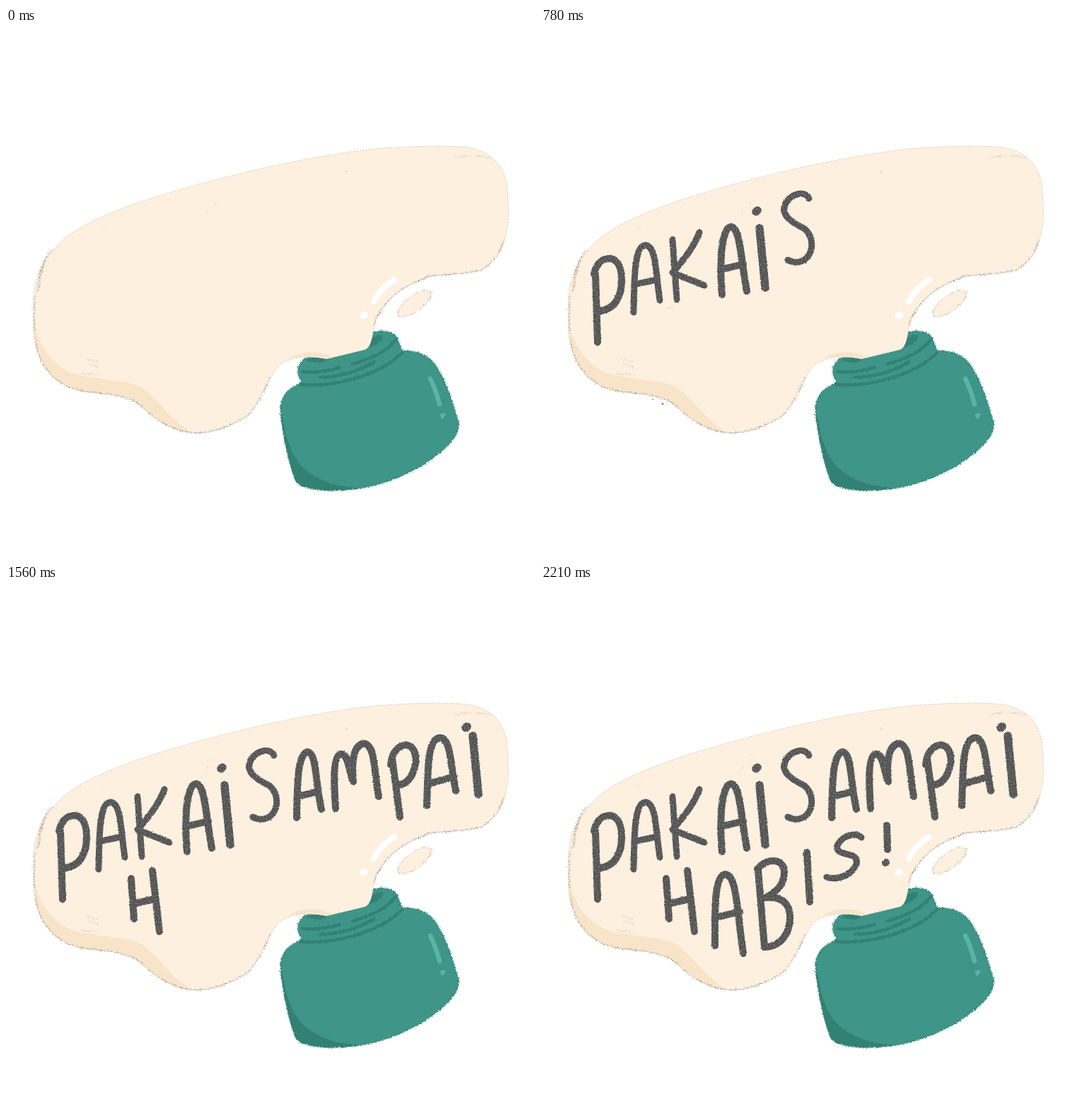
Recreate the animation shown at these times as an HTML page. Size 748 px wide and 748 px high, loop 2.47 s.

```html
<!DOCTYPE html>
<html lang="id">
<head>
<meta charset="utf-8">
<title>Pakai sampai habis!</title>
<style>
  html, body { margin: 0; width: 100%; height: 100%; overflow: hidden; background: #fff; }
  svg { display: block; width: 100vw; height: 100vh; }
  path { stroke-linecap: round; stroke-linejoin: round; }
  .line { fill: none; }
  .dark { stroke: #328174; stroke-width: 4.5; }
  .grit { stroke: #756b60; stroke-width: 1; stroke-dasharray: 1 1.5; stroke-linecap: butt; opacity: .75; }
  .fine { stroke: #9b958c; stroke-width: .8; stroke-dasharray: 1 3; stroke-linecap: butt; opacity: .6; }
  #letters path { fill: none; stroke: #4f5052; stroke-width: 10; }
  #letters .thin { stroke-width: 9; }
  #letters .thick { stroke-width: 11.5; }
</style>
</head>
<body>
<svg viewBox="0 0 748 748" role="img" aria-label="PAKAI SAMPAI HABIS!">
  <defs>
    <!-- The noise is made opaque so that the displacement has no overall drift. -->
    <filter id="rough" filterUnits="userSpaceOnUse" x="0" y="0" width="748" height="748" color-interpolation-filters="sRGB">
      <feTurbulence type="fractalNoise" baseFrequency=".45" numOctaves="2" seed="4"/>
      <feColorMatrix values="1 0 0 0 0  0 1 0 0 0  0 0 1 0 0  0 0 0 0 1" result="noise"/>
      <feDisplacementMap in="SourceGraphic" in2="noise" scale="4" xChannelSelector="R" yChannelSelector="G"/>
    </filter>
    <filter id="spray" filterUnits="userSpaceOnUse" x="0" y="0" width="748" height="748" color-interpolation-filters="sRGB">
      <feTurbulence type="fractalNoise" baseFrequency=".6" numOctaves="2" seed="9"/>
      <feColorMatrix values="1 0 0 0 0  0 1 0 0 0  0 0 1 0 0  0 0 0 0 1" result="noise"/>
      <feDisplacementMap in="SourceGraphic" in2="noise" scale="8" xChannelSelector="R" yChannelSelector="G"/>
    </filter>
    <filter id="chalk" filterUnits="userSpaceOnUse" x="0" y="0" width="748" height="748" color-interpolation-filters="sRGB">
      <feTurbulence type="fractalNoise" baseFrequency=".5" numOctaves="2" seed="2" result="grain"/>
      <feColorMatrix values="1 0 0 0 0  0 1 0 0 0  0 0 1 0 0  0 0 0 0 1" result="noise"/>
      <feDisplacementMap in="SourceGraphic" in2="noise" scale="2.5" xChannelSelector="R" yChannelSelector="G" result="edge"/>
      <feColorMatrix in="grain" values="0 0 0 0 0  0 0 0 0 0  0 0 0 0 0  0 0 0 .8 .55" result="cover"/>
      <feComposite in="edge" in2="cover" operator="in"/>
    </filter>
    <path id="blob" d="M68 313C90 283 150 258 220 236C340 200 440 180 520 171C580 166 630 166 655 169C688 177 700 190 708 218C710 240 711 260 710 275C705 310 695 330 672 342C645 350 620 347 600 351C565 362 540 380 525 408C517 430 519 451 507 455L453 468C430 463 402 464 385 478C372 495 360 525 345 545C325 562 295 571 270 573C240 572 210 555 190 533C165 515 130 518 105 513C75 506 45 485 39 430L39 380C42 350 50 330 68 313Z"/>
    <path id="body" d="M430 464L519 430Q545 425 553 438L560 457C580 455 595 463 604 472C622 495 631 530 640 558Q641 573 628 587C592 624 530 654 460 654Q416 653 409 639C401 617 392 580 388 540C388 522 400 508 418 502L413 490Q411 470 430 464Z"/>
    <clipPath id="inBlob"><use href="#blob"/></clipPath>
    <clipPath id="inJar"><use href="#body"/></clipPath>
  </defs>

  <g filter="url(#rough)">
    <use href="#body" fill="#3e9588" stroke="#3e9588"/>
    <g clip-path="url(#inJar)">
      <path fill="#328174" d="M386 515C391 560 397 598 421 623C443 641 466 648 495 650L490 665H400L380 560Z"/>
      <path fill="#328174" d="M424 470Q434 463 454 469L445 474ZM512 446Q517 434 532 434Q538 441 514 452Z"/>
    </g>
    <path class="line dark" d="M420 486Q446 488 472 480M444 494C474 494 500 484 521 472M490 475C516 468 538 458 551 441M417 504C460 508 525 494 560 459"/>
  </g>
  <use href="#body" class="line" filter="url(#spray)" stroke="#2c7468" stroke-dasharray="1 2"/>
  <path class="line" stroke="#59b3a6" stroke-width="6.5" d="M600 496Q608 512 613 532"/>
  <path fill="#59b3a6" stroke="#59b3a6" stroke-width="3" d="M615 547L620 546L617 551Z"/>

  <use href="#blob" fill="#f8e5c9"/>
  <g clip-path="url(#inBlob)">
    <path fill="#fdf0df" d="M39 412C45 452 70 484 105 491C140 498 168 498 188 506C212 519 234 557 265 573L345 573L748 480V100H0V412Z"/>
    <path fill="#f8e5c9" d="M398 468C416 455 448 455 464 468C440 463 420 463 398 468Z"/>
  </g>
  <ellipse cx="577.500" cy="389.500" rx="28.500" ry="11.500" transform="rotate(-36 577.500 389.500)" fill="#fdf0df"/>

  <path class="line" stroke="#fff" stroke-width="8" d="M520 387C526 374 536 364 549 356"/>
  <ellipse cx="506" cy="406" rx="6" ry="5" transform="rotate(-30 506 406)" fill="#fff"/>

  <use href="#blob" class="line fine"/>
  <g filter="url(#spray)" class="line grit">
    <path d="M64 315C52 332 45 350 44 375M61 317Q48 340 47 370M40 380V428"/>
    <path d="M41 440C48 485 75 507 105 513C130 517 165 516 190 533C210 555 240 572 270 573C295 571 325 562 345 545Q362 524 374 493"/>
    <path d="M525 408C538 382 565 362 600 351C620 347 645 350 672 342Q694 330 704 300"/>
    <path d="M520 420Q523 407 530 402"/>
    <ellipse cx="577.500" cy="389.500" rx="28" ry="11" transform="rotate(-36 577.500 389.500)"/>
    <path opacity=".4" d="M634 184Q660 177 688 184M114 468L130 472M117 475L130 479M106 488L132 491M293 251L299 245M280 261L286 258M136 284L142 281M480 203H484"/>
  </g>
  <g id="specks" class="line">
    <path stroke="#706860" stroke-width="1.500" d="M171 531L173 532M158 525H158.500"/>
    <path stroke="#f5dfb8" stroke-width="1.500" d="M177 397Q183 396 188 393"/>
  </g>

  <g id="letters" filter="url(#chalk)">
    <path d="M77 348L80 444M75 348C79 330 88 326 98 326C110 328 114 342 114 357C114 380 104 398 83 400"/>
    <path class="thin" d="M131 402C132 360 131 306 148 307C163 309 162 345 168 385M134 362L164 356"/>
    <path class="thin" d="M186 299L192 384M224 289C215 312 200 330 186 346L231 364"/>
    <path d="M256 377C252 330 255 282 269 281C282 283 283 330 291 372M257 341L286 334"/>
    <path class="thick" d="M309 283L317 367M304 260L306 258"/>
    <path class="thin" d="M379 241C374 230 356 233 347 246C336 264 355 275 371 283C388 294 387 325 365 331Q356 332 349 328"/>
    <path d="M411 329C412 290 411 237 427 236C440 239 437 280 446 317M413 299L441 292"/>
    <path d="M466 316C464 285 461 240 474 239C485 240 484 262 491 278C488 248 492 226 506 224C523 227 520 265 527 299"/>
    <path d="M546 245L557 328M544 254C546 234 556 227 566 226C583 230 581 253 575 266Q568 283 551 283"/>
    <path d="M595 312C597 270 594 217 614 216C630 218 628 255 636 291M598 281L633 271"/>
    <path class="thick" d="M660 213L668 296M650 202L652 200"/>
    <path d="M177 415L181 472M207 404L217 490M179 451L210 444"/>
    <path d="M246 510C246 465 244 410 261 409C277 411 277 460 286 521M247 470L281 462"/>
    <path d="M307 403L316 512M306 402C318 386 343 385 344 405C344 424 334 433 318 442C340 440 353 450 352 472C351 495 338 511 317 512"/>
    <path d="M376 378L380 448"/>
    <path class="thin" d="M453 357C445 349 428 354 420 366C414 378 428 379 441 383C453 390 443 404 430 411Q415 417 404 413"/>
    <path d="M489 340L490 374M487 393L488 392"/>
  </g>
</svg>
<script>
  const LOOP = 2470, STEP = 130;
  const letters = [...document.querySelectorAll('#letters path')];
  const specks = document.getElementById('specks');
  const show = (el, on) => { el.style.visibility = on ? 'visible' : 'hidden'; };
  let shown = -1;

  function draw() {
    const count = Math.min(letters.length, Math.floor(performance.now() % LOOP / STEP));
    if (count !== shown) {
      shown = count;
      letters.forEach((letter, i) => show(letter, i < count));
      show(specks, count > 0 && count < 12);
    }
    requestAnimationFrame(draw);
  }
  draw();
</script>
</body>
</html>
```
